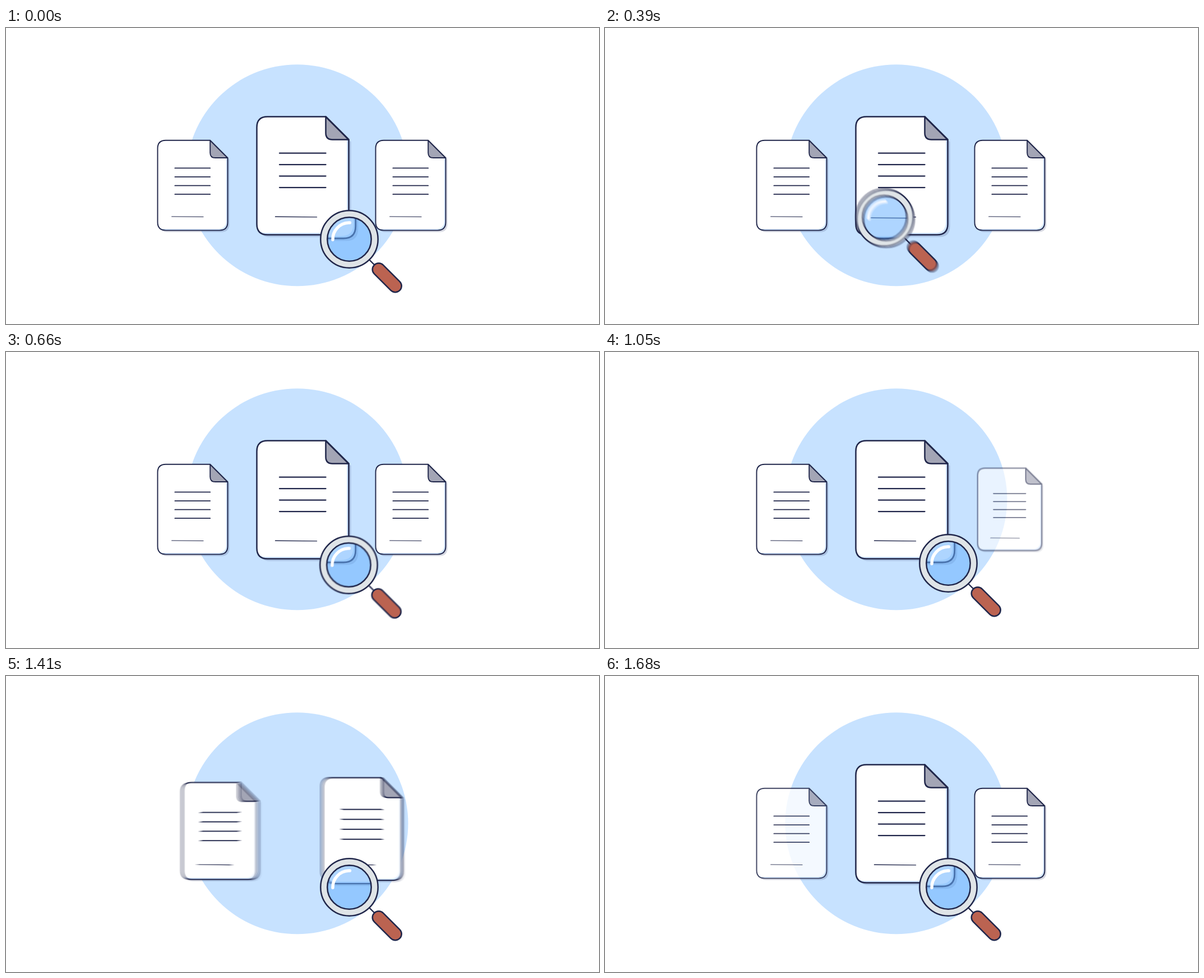
An HTML page with a canvas that plays this animation: 1058x529 px, repeating every 1.71 s.

```html
<!DOCTYPE html>
<html lang="en">
<head>
<meta charset="utf-8">
<title>Document check</title>
<style>
  html, body { margin: 0; width: 100%; height: 100%; overflow: hidden; background: #fff; }
  canvas { display: block; width: 100vw; height: 100vh; }
</style>
</head>
<body>
<canvas id="stage" width="1058" height="529"></canvas>
<script>
const W = 1058, H = 529, LOOP = 1710, STEP = 30;
const SHUTTER = 15, SAMPLES = 8;
const NAVY = '#20264a', SKY = '#c7e2ff';

const newContext = () =>
  Object.assign(document.createElement('canvas'), { width: W, height: H }).getContext('2d');
const stage = document.getElementById('stage').getContext('2d');
const scene = newContext();
const layer = newContext();

const linear = (t, start, length) => Math.min(1, Math.max(0, (t - start) / length));
const smooth = (t, start, length) => {
  const x = linear(t, start, length);
  return x * x * (3 - 2 * x);
};
const mix = (a, b, p) => a + (b - a) * p;

// Sheet poses: centre x, centre y, scale
const LEFT = [333, 281.2, 0.762];
const CENTRE = [529.5, 264, 1];
const RIGHT = [722, 281.2, 0.762];
const between = (a, b, p) => a.map((v, i) => mix(v, b[i], p));
const shrunk = (pose, p) => [pose[0], pose[1], pose[2] * mix(0.7, 1, p)];

// Magnifier route: time, offset x, offset y
const ROUTE = [
  [0, 0, 0], [120, -14, -10], [240, -78, -44], [330, -117, -52], [390, -113, -38],
  [480, -65, 3], [555, -22, 16], [660, -1, 3], [700, 0, 0], [LOOP, 0, 0]
];

function routeAt(t) {
  const i = Math.max(0, ROUTE.findIndex(k => k[0] > t) - 1);
  const a = ROUTE[i], b = ROUTE[i + 1], span = b[0] - a[0];
  const u = (t - a[0]) / span;
  const slope = (n, axis) => {
    if (n === 0 || n >= ROUTE.length - 2) return 0;
    const p = ROUTE[n - 1], q = ROUTE[n + 1];
    return (q[axis] - p[axis]) / (q[0] - p[0]);
  };
  return [1, 2].map(axis =>
    mix(a[axis], b[axis], u * u * (3 - 2 * u)) +
    span * u * (1 - u) * ((1 - u) * slope(i, axis) - u * slope(i + 1, axis)));
}

// Sheet geometry around its own centre
const X = 82, Y = 105.5, FOLD = 41;
const outline = new Path2D(`M${-X + 19} ${-Y}H${X - FOLD}L${X} ${-Y + FOLD}V${Y - 19}
  q0 19 -19 19H${-X + 19}q-19 0 -19 -19V${-Y + 19}q0 -19 19 -19Z`);
const fold = new Path2D(`M${X - FOLD} ${-Y}v29q0 12 12 12H${X}Z`);

function stroke(c, x1, y1, x2, y2, width, color = NAVY) {
  c.lineCap = 'round';
  c.lineWidth = width;
  c.strokeStyle = color;
  c.beginPath();
  c.moveTo(x1, y1);
  c.lineTo(x2, y2);
  c.stroke();
}

function drawSheet(c, [x, y, scale]) {
  c.save();
  c.translate(x, y);
  c.scale(scale, scale);
  c.lineJoin = 'round';

  c.save();
  c.translate(4, 4);
  c.fillStyle = 'rgba(50, 60, 105, .2)';
  c.fill(outline);
  c.restore();

  c.fillStyle = '#d3e7ff';
  c.fill(outline);
  c.save();
  c.clip(outline);
  c.translate(-3.5, -3.5);
  c.fillStyle = '#fff';
  c.fill(outline);
  c.fillRect(-X, -Y, 2 * X - FOLD, FOLD);
  c.restore();

  c.strokeStyle = NAVY;
  c.lineWidth = 2.5;
  c.fillStyle = '#a3a5b5';
  c.fill(fold);
  c.stroke(fold);
  c.stroke(outline);

  for (let i = 0; i < 4; i++) {
    const row = -40.3 + i * 20.45;
    stroke(c, -41.5, row, 41, row, 2.3);
  }
  stroke(c, -49, 73.2, 25, 73.9, 1.4);
  c.restore();
}

function drawFaded(pose, alpha) {
  if (alpha <= 0) return;
  layer.clearRect(0, 0, W, H);
  drawSheet(layer, pose);
  scene.globalAlpha = alpha;
  scene.drawImage(layer.canvas, 0, 0);
  scene.globalAlpha = 1;
}

function disc(c, x, y, r, fill, width = 0) {
  c.beginPath();
  c.arc(x, y, r, 0, Math.PI * 2);
  c.fillStyle = fill;
  c.fill();
  if (!width) return;
  c.lineWidth = width;
  c.strokeStyle = NAVY;
  c.stroke();
}

function drawMagnifier(c, [dx, dy], sheets) {
  const x = 612.5 + dx, y = 377.5 + dy;
  stroke(c, x + 35, y + 36, x + 46, y + 47, 2.4);
  stroke(c, x + 52.5, y + 54, x + 82, y + 83.5, 25);
  stroke(c, x + 52.5, y + 54, x + 82, y + 83.5, 20, '#bb6351');
  disc(c, x, y, 51.2, '#dfe4e7', 2.5);

  c.save();
  disc(c, x, y, 39.2, SKY);
  c.clip();
  c.translate(524, 323);
  c.scale(1.14, 1.14);
  c.translate(-524, -323);
  sheets.forEach(pose => drawSheet(c, pose));
  c.restore();
  disc(c, x, y, 39.2, 'rgba(108, 178, 255, .55)', 2.5);

  c.beginPath();
  c.arc(x, y, 29.5, Math.PI * 0.99, Math.PI * 1.51);
  c.lineCap = 'round';
  c.lineWidth = 5.5;
  c.strokeStyle = '#fff';
  c.stroke();
}

function drawScene(t) {
  const leaving = smooth(t, 1129, 527);
  const arriving = smooth(t, 1280, 400);
  const outgoing = between(CENTRE, RIGHT, leaving);
  const incoming = between(LEFT, CENTRE, arriving);

  scene.fillStyle = '#fff';
  scene.fillRect(0, 0, W, H);
  disc(scene, 519.5, 263.3, 198, SKY);

  drawFaded(shrunk(RIGHT, 1 - smooth(t, 980, 200)), 1 - linear(t, 980, 200));
  drawFaded(shrunk(LEFT, smooth(t, 1470, 200)), linear(t, 1490, 225));
  drawSheet(scene, outgoing);
  drawSheet(scene, incoming);
  drawMagnifier(scene, routeAt(t), leaving < 0.6 ? [outgoing] : [incoming]);
}

// Averages several moments per step for motion blur
function render(t) {
  for (let i = 0; i < SAMPLES; i++) {
    const moment = t + SHUTTER * ((i + 0.5) / SAMPLES - 0.5);
    drawScene(Math.min(LOOP - 1, Math.max(0, moment)));
    stage.globalAlpha = 1 / (i + 1);
    stage.drawImage(scene.canvas, 0, 0);
  }
}

const began = performance.now();
let shown = -1;
function tick() {
  const t = Math.floor(((performance.now() - began) % LOOP) / STEP) * STEP;
  if (t !== shown) render(shown = t);
  requestAnimationFrame(tick);
}
tick();
</script>
</body>
</html>
```
